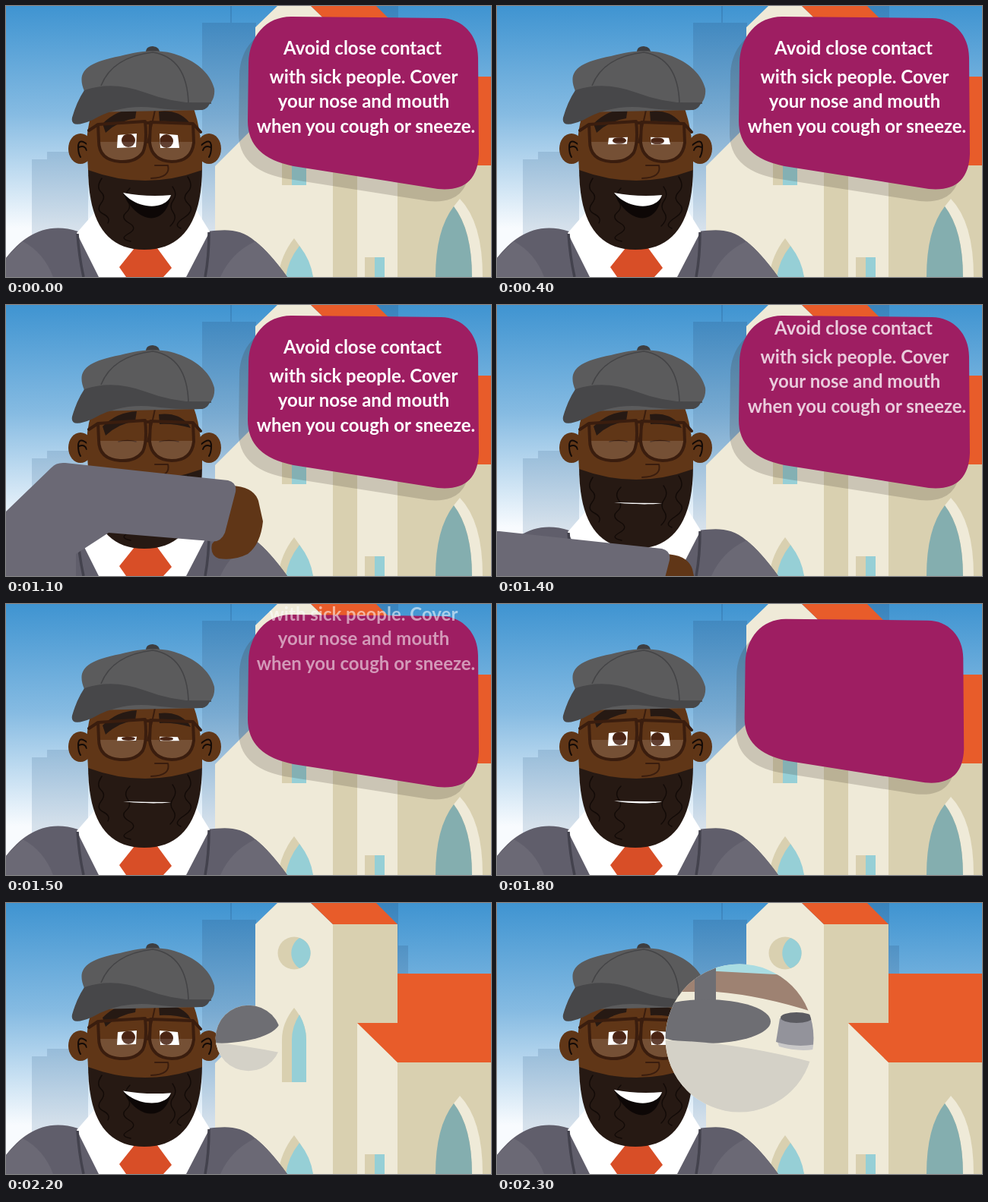
An HTML page that plays this animation: 638 by 357 pixels, repeating every 2400 ms.

```html
<!DOCTYPE html>
<html lang="en">
<head>
<meta charset="utf-8">
<title>Cover your cough</title>
<style>
html, body { margin: 0; width: 100%; height: 100%; overflow: hidden }
svg { display: block; width: 638px; height: 357px }
text { font: 700 24px Lato, "Open Sans", sans-serif; text-anchor: middle; fill: #fff }
.cream { fill: #efead8 } .tan { fill: #d9d0b0 } .roof { fill: #e85c2a } .glass { fill: #96cfd6 }
.coat { fill: #605e6b } .sleeve { fill: #6b6975 } .skin { fill: #603617 } .dark { fill: #261913 }
.line { fill: none; stroke: #3a1d0e; stroke-width: 2; stroke-linecap: round; stroke-linejoin: round }
</style>
</head>
<body>
<svg viewBox="0 0 638 357">
  <defs>
    <linearGradient id="sky" x2="0" y2="1">
      <stop stop-color="#3f94d1"/><stop offset=".4" stop-color="#86bbe2"/><stop offset=".82" stop-color="#f8fbfe"/>
    </linearGradient>
    <linearGradient id="haze" gradientUnits="userSpaceOnUse" x2="0" y2="357">
      <stop stop-color="#2f6fa5" stop-opacity=".45"/><stop offset="1" stop-color="#b4c4d4" stop-opacity=".35"/>
    </linearGradient>
    <clipPath id="iris"><circle id="hole" cx="319" cy="178"/></clipPath>
    <path id="whites" d="M147 170L172 168L171 186L146 187ZM202 168L226 170L228 187L203 187Z"/>
    <clipPath id="sockets"><use href="#whites"/></clipPath>
    <path id="panel" d="M375 14L572 16C600 16 621 38 621 68L622 195Q620 246 568 241L378 211Q317 199 318 150L319 75C320 40 342 14 375 14Z"/>
    <g id="ear">
      <ellipse class="skin" cx="98" cy="188" rx="16" ry="20"/>
      <path class="line" style="stroke:#120a07" d="M109 184Q95 172 95 186Q95 194 98 199M96 186Q104 183 106 190"/>
    </g>
  </defs>

  <rect width="638" height="357" fill="url(#sky)"/>
  <path fill="url(#haze)" d="M34 357V202H54V192H84V197H108V357ZM258 357V22H295V0H297V22H329V357ZM440 0H516V56H529V100H440Z"/>

  <g id="church">
    <path class="cream" d="M328 28L357 0H401L430 28V357H275V211L328 158Z"/>
    <path class="tan" d="M430 28H515V357H430ZM515 210H638V357H515Z"/>
    <path class="cream" d="M462 158L515 210V357H462Z"/>
    <path class="roof" d="M401 0H487L515 28H430ZM462 158H515V93H638V210H515Z"/>
    <circle class="tan" cx="379" cy="66" r="21.5"/>
    <path class="tan" d="M379 138Q363 158 363 180V236H395V180Q395 158 379 138M379 306Q361 329 358 357H404Q398 330 379 306M472 331H485V357H472Z"/>
    <path class="glass" d="M386 46A21 21 0 0 1 386 86A24 24 0 0 1 386 46M386 147Q376 163 376 180V236H395V180Q395 163 386 147M386 316Q371 335 368 357H404Q401 335 386 316M485 331H498V357H485Z"/>
    <path class="cream" d="M597 254Q627 285 627 357H613Q613 295 589 264Z"/>
    <path fill="#84aeaf" d="M589 264Q565 295 565 357H613Q613 295 589 264"/>
  </g>

  <g id="bubble">
    <use href="#panel" x="-12" y="16" fill="#3c3228" opacity=".2"/>
    <use href="#panel" fill="#9e1e62"/>
  </g>
  <g id="words">
    <text x="469" y="64">Avoid close contact</text>
    <text x="470.5" y="102">with sick people. Cover</text>
    <text x="470.5" y="134">your nose and mouth</text>
    <text x="473.5" y="167">when you cough or sneeze.</text>
  </g>

  <g id="body">
    <path class="coat" d="M0 332C22 304 52 283 95 297H265C290 294 308 293 328 310Q347 325 370 357H0Z"/>
    <path class="sleeve" d="M0 332L22 310Q50 325 62 357H0ZM328 310Q296 325 282 357H370Q347 325 328 310Z"/>
    <path fill="#fff" d="M93 299L120 268H250L268 297L237 357H122Z"/>
    <path fill="none" stroke="#43424d" stroke-width="3.5" d="M94 300Q96 330 102 357M267 298Q267 330 262 357"/>
    <path fill="#d84e27" d="M169 319H199L218 345L207 357H158L149 344Z"/>
  </g>

  <g id="head">
    <use href="#ear"/><use href="#ear" transform="translate(365) scale(-1 1)"/>
    <path class="dark" d="M108 212C108 282 130 321 182 321C234 321 258 282 258 212Z"/>
    <path class="skin" d="M106 180Q108 145 120 128H244Q256 155 258 200V216Q183 244 108 216Z"/>
    <path class="line" style="stroke:#120a07;stroke-width:1.4" d="M126 227q-8 12-1 18t0 15t3 14t6 12M163 240q-9 9-3 17t-2 15t4 14t-1 14t3 10M239 225q8 12 0 20t1 16t-6 18t-4 14M219 238q7 10 1 18t0 16t-4 18"/>
    <path id="mouth" fill="#0d0706"/>
    <path id="teeth" fill="#fff"/>
    <path class="line" d="M197 132Q193 153 186 180M196 210H213Q217 226 191 227"/>
    <path class="line" style="stroke-width:1.5" d="M148 180Q160 177 171 180M202 180Q214 177 227 180"/>
    <g id="eyes" >
      <use href="#whites" fill="#fff"/>
      <g fill="#4a2413" clip-path="url(#sockets)"><circle cx="161" cy="177" r="9"/><circle cx="211" cy="178" r="9"/></g>
    </g>
    <path id="brows" class="dark" d="M127 151Q146 132 172 131L170 144Q148 147 131 163ZM201 135Q226 132 240 148L243 153Q222 147 202 148Z"/>
    <path fill="#fff" opacity=".13" d="M122 179H183Q184 204 152 205Q124 203 122 179M189 179H246Q246 203 218 205Q190 204 189 179"/>
    <path class="line" style="stroke-width:4" d="M121 156L183 152Q186 180 180 193Q171 206 150 205Q122 203 122 178ZM190 153L246 155L247 180Q244 205 218 205Q192 204 189 180ZM183 154H190M109 164L121 156M246 155L256 166"/>
    <path fill="#3e3e40" d="M184 63Q183 53 193 53Q203 54 202 63Z"/>
    <path fill="#5b5b5c" d="M103 112C93 88 103 75 150 66C180 58 205 56 230 66C258 77 270 94 274 109Q276 127 258 137L110 140Z"/>
    <path fill="none" stroke="#444446" stroke-width="1.6" d="M193 61Q140 67 125 105M193 61Q238 68 240 128M238 128H270"/>
    <path fill="#474749" d="M103 111Q140 98 183 114Q225 130 268 128Q265 136 258 137Q225 138 195 134Q150 129 114 150Q84 163 87 147Q93 126 103 111Z"/>
  </g>

  <g id="arm">
    <path class="skin" d="M296 238Q326 239 332 258L338 285Q335 315 318 328Q300 337 280 334Q268 330 271 315L290 290Z"/>
    <path class="sleeve" d="M0 272L60 214Q66 207 78 208L292 231Q304 234 302 246L288 300Q282 314 268 311L135 300L92 328V357H0Z"/>
  </g>

  <g id="next" clip-path="url(#iris)">
    <path class="cream" d="M220 78H420V280H220Z"/>
    <path fill="#a9dce2" d="M220 78H420V100H220Z"/>
    <path fill="#9e8272" d="M220 86L290 90L420 97V145Q350 122 288 117H220Z"/>
    <path fill="#6e6e73" d="M260 78H288V140H260Z"/>
    <ellipse cx="275" cy="156" rx="85" ry="29" fill="#6e6e73"/>
    <path fill="#d4d1c7" d="M220 181Q310 182 420 211V280H220Z"/>
    <path fill="#c9c8c8" d="M368 180L371 189Q395 196 416 193V180Z"/>
    <path fill="#93939b" d="M372 152L367 183Q393 191 420 186V151Z"/>
    <ellipse cx="394" cy="151" rx="21" ry="7" fill="#5b5b61"/>
  </g>
</svg>
<script>
const LOOP = 2400, STEP = 100;
const el = id => document.getElementById(id);
const set = (id, name, value) => el(id).setAttribute(name, value);

// Linear interpolation through [time, value] pairs
function track(t, ...keys) {
  let [t0, v0] = keys[0];
  for (const [t1, v1] of keys) {
    if (t < t1) return v0 + (v1 - v0) * Math.max(0, (t - t0) / (t1 - t0));
    [t0, v0] = [t1, v1];
  }
  return v0;
}

function drawFace(t) {
  const open = track(t, [300, 1], [500, 0], [600, 1], [900, 1], [1100, 0], [1400, 0], [1500, .3], [1700, 1]);
  set('eyes', 'transform', `translate(0 ${177.5 * (1 - open)}) scale(1 ${open})`);
  set('brows', 'transform', `translate(0 ${track(t, [900, 4], [1100, 9], [1500, 9], [1800, 0], [2300, 0])})`);

  const smile = track(t, [900, 1], [1100, 0], [1700, 0], [1900, .12], [2200, .9], [2300, 1]);
  const y = 260 - 14 * smile;
  const lips = depth => `M154 ${y}Q185 ${y + 1 + 5 * smile} 217 ${y + 1 + 2 * smile}` +
    `C211 ${y + 2 + depth} 173 ${y + 2 + depth} 154 ${y}Z`;
  set('mouth', 'd', lips(42 * smile));
  set('teeth', 'd', lips(1 + 20 * smile));
}

function draw(t) {
  drawFace(t);

  const away = 1 - track(t, [900, 0], [1100, 1], [1300, 1], [1500, 0]);
  set('arm', 'transform', `translate(${-150 * away} ${180 * away})`);

  set('words', 'transform', `translate(0 ${track(t, [1300, 0], [1400, -25], [1500, -80], [1600, -170])})`);
  set('words', 'opacity', track(t, [1300, 1], [1500, .55], [1700, 0]));

  const shrink = Math.min(1, Math.max(0, (t - 1700) / 200)) ** 4.3;
  set('bubble', 'transform', `translate(${469 * shrink} ${128 * shrink}) scale(${1 - shrink})`);

  set('hole', 'r', 97.5 * Math.max(0, (t - 2000) / 300) ** 2);
}

function tick() {
  draw(Math.floor(performance.now() % LOOP / STEP) * STEP);
  requestAnimationFrame(tick);
}
tick();
</script>
</body>
</html>
```
